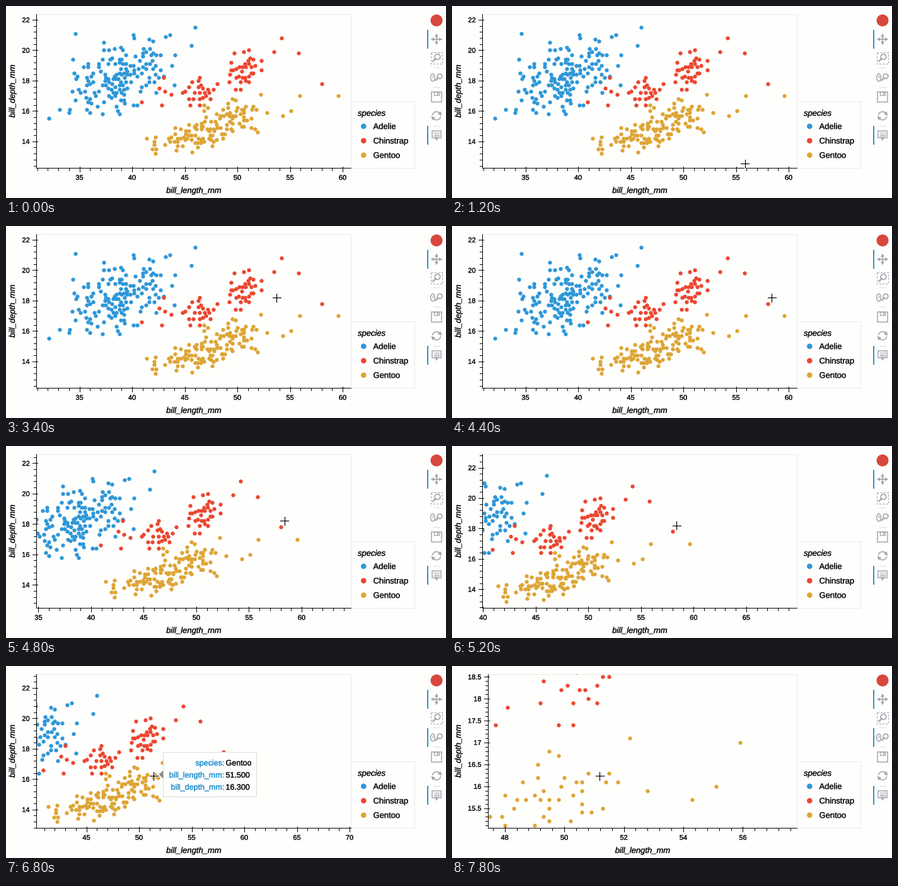
A matplotlib script that plays this animation: 698 by 306 pixels, repeating every 8000 ms.

```python
import math

import numpy as np
import matplotlib.pyplot as plt
from matplotlib.animation import FuncAnimation
from matplotlib.patches import Circle, Ellipse, FancyBboxPatch, Polygon, Rectangle
from matplotlib.patheffects import withStroke
from matplotlib.transforms import Affine2D

W, H, DPI = 698, 306, 100
STEP, FRAMES = 200, 40
PT = 72 / DPI  # points per pixel

BG, INK, EDGE, ICON, ACTIVE = "#fefefd", "#161616", "#e9e9e6", "#a1a6ac", "#2b95cf"
COLORS = {"Adelie": "#2e97d8", "Chinstrap": "#ec4630", "Gentoo": "#dda535"}
LEFT, TOP, RIGHT, BOTTOM = 48, 13, 547, 258

plt.rcParams["font.family"] = "Liberation Sans"
fig = plt.figure(figsize=(W / DPI, H / DPI), dpi=DPI, facecolor=BG)
ax = fig.add_axes([0, 0, 1, 1])
ax.set_xlim(0, W)
ax.set_ylim(H, 0)
ax.axis("off")


# ---------- drawing helpers ----------
def text(x, y, s="", size=13, color=INK, z=5, **kw):
    heavier = [withStroke(linewidth=0.35 * PT, foreground=color)]
    return ax.text(x, y, s, fontsize=size * PT, color=color, zorder=z,
                   path_effects=heavier, **kw)


def line(xs, ys, w=1, color=INK, z=4, **kw):
    return ax.plot(xs, ys, lw=w * PT, color=color, zorder=z, **kw)[0]


def shape(patch, face="none", edge="none", w=1, z=4):
    patch.set(facecolor=face, edgecolor=edge, linewidth=w * PT, zorder=z)
    return ax.add_patch(patch)


def rounded(x, y, w, h, r):
    return FancyBboxPatch((x, y), w, h, boxstyle=f"round,pad=0,rounding_size={r}")


# ---------- data ----------
rng = np.random.default_rng(7)


def cloud(n, mean, sd, corr, reach=2.1):
    """Correlated normal points on a 0.1 grid, cut at reach, without near twins."""
    pts = []
    while len(pts) < n:
        u, v = rng.standard_normal(2)
        v = corr * u + math.sqrt(1 - corr ** 2) * v
        x, y = round(mean[0] + sd[0] * u, 1), round(mean[1] + sd[1] * v, 1)
        twin = any(abs(x - a) < 0.2 and abs(y - b) < 0.15 for a, b in pts)
        if max(abs(u), abs(v)) < reach and not twin:
            pts.append((x, y))
    return pts


data = {
    "Adelie": cloud(145, (38.9, 18.4), (2.5, 1.25), 0.35)
    + [(32.1, 15.5), (33.1, 16.1), (34.6, 21.1), (46, 21.5), (45.6, 20.3), (44.1, 19.7)],
    "Chinstrap": cloud(24, (46.4, 17.6), (0.9, 0.75), 0.3)
    + cloud(34, (50.6, 19), (0.9, 0.75), 0.3)
    + cloud(5, (42.9, 17.2), (0.5, 0.6), 0)
    + [(58, 17.8), (55.8, 19.8), (54.2, 20.8), (53.5, 19.9), (40.9, 16.6)],
    "Gentoo": cloud(58, (45.5, 14.3), (2, 0.55), 0.35)
    + cloud(58, (49.2, 15.6), (1.8, 0.7), 0.3)
    + [(59.6, 17), (55.9, 17), (55.1, 16), (54.3, 15.7), (51.5, 16.3), (52.2, 17.1)],
}
data = {name: np.array(pts) for name, pts in data.items()}


# ---------- motion ----------
X0, X_SPAN, Y0, Y_SPAN = 30.898, 29.88, 12.257, 10.115
GRAB, DROP, TOOL = (507, 114), (351, 127), (674, 119)
ZOOM = 2.88
ENTER, TOOL_ON, TIP, ZOOM_AT = 1000, 6200, (6800, 7000), (7000, 7600)
LEGS = [(1000, 2200, (402, 114)), (3000, 4200, GRAB), (4400, 5300, DROP),
        (5300, 5800, TOOL), (6200, 6800, (234, 175))]


def ease(t, start, end):
    u = min(max((t - start) / (end - start), 0), 1)
    return u * u * (3 - 2 * u)


def pointer(t):
    pos = np.array([470.0, 262.0])
    for start, end, goal in LEGS:
        pos = pos + (np.array(goal) - pos) * ease(t, start, end)
    return pos


def view(t):
    """Axis ranges: dragged with the pointer, then zoomed about one point."""
    dx, dy = (np.array(DROP) - GRAB) * ease(t, 4400, 5300)
    k = ZOOM ** ease(t, *ZOOM_AT)
    x0 = X0 - dx * X_SPAN / (RIGHT - LEFT) + 0.369 * X_SPAN * (1 - 1 / k)
    y0 = Y0 + dy * Y_SPAN / (BOTTOM - TOP) + 0.3415 * Y_SPAN * (1 - 1 / k)
    return x0, X_SPAN / k, y0, Y_SPAN / k


def ticks(start, span):
    """Major and minor tick values, about six majors per axis."""
    base = 10 ** math.floor(math.log10(span / 6))
    step = min((m * base for m in (1, 2, 5, 10)), key=lambda s: abs(6 - span / s))

    def steps(d):
        first, last = math.ceil(start / d - 1e-6), math.floor((start + span) / d + 1e-6)
        return [round(i * d, 6) for i in range(first, last + 1)]

    return steps(step), steps(step / 5)


# ---------- fixed parts ----------
frame = shape(Rectangle((LEFT, TOP), RIGHT - LEFT, BOTTOM - TOP), edge=EDGE, z=1)
shape(Rectangle((547, 152), 101, 106), face=BG, edge=EDGE, z=3)
text(558, 175, "species", style="italic")
for i, (name, color) in enumerate(COLORS.items()):
    y = 191.7 + 23 * i
    shape(Circle((567.3, y), 4.3), face=color)
    text(582.5, y + 4.4, name)

x_title = text(298, 298, "bill_length_mm", style="italic", ha="center")
text(14, 135.5, "bill_depth_mm", style="italic", ha="center", rotation=90,
     rotation_mode="anchor")


def magnifier(x, y, r, reach):
    shape(Circle((x, y), r), edge=ICON, w=1.7)
    k = r * 0.72
    line([x - k, x - k - reach], [y + k, y + k + reach], 2.4, ICON)


def arrow_head(x, y, angle, size=3.6):
    a = np.radians(angle + np.array([0, 125, 235]))
    shape(Polygon(np.c_[x + size * np.cos(a), y + size * np.sin(a)]), face=ICON)


def toolbar(x):
    shape(Circle((x, 23), 9.5), face="#d8473c")
    for y in (98, 129, 191):
        line([x - 5, x + 5], [y, y], 1, "#dcdcd8")

    # pan
    for a in range(0, 360, 90):
        c, s = math.cos(math.radians(a)), math.sin(math.radians(a))
        line([x, x + 6 * c], [53, 53 + 6 * s], 1.6, ICON)
        arrow_head(x + 5.8 * c, 53 + 5.8 * s, a)

    # box zoom
    shape(Rectangle((x - 9, 74), 18, 18), edge=ICON, w=1.2).set_linestyle((0, (2.4, 2)))
    magnifier(x + 1.5, 81, 4.3, 4)

    # wheel zoom
    shape(Ellipse((x - 6, 114), 6.5, 12), edge=ICON, w=1.5)
    line([x - 6, x - 6], [111, 114], 1.2, ICON)
    magnifier(x + 5, 112, 3.8, 3.6)

    # save
    shape(Rectangle((x - 8, 137), 16, 16), edge=ICON, w=1.5)
    shape(Rectangle((x - 4, 137), 8, 5), edge=ICON, w=1.3)
    line([x + 1.6, x + 1.6], [138, 141], 1.6, ICON)

    # reset
    for a0 in (195, 15):
        a = np.radians(np.linspace(a0, a0 + 135, 20))
        xs, ys = x + 6.6 * np.cos(a), 175 + 6.6 * np.sin(a)
        line(xs, ys, 1.6, ICON)
        arrow_head(xs[-1], ys[-1], a0 + 215, 4)

    # hover
    shape(Rectangle((x - 7, 199), 14, 11), edge=ICON, w=1.5)
    arrow_head(x, 211.5, 90, 3.5)
    for y in (202, 204.5, 207):
        line([x - 4.2, x + 4.2], [y, y], 1.1, ICON)


def active_bar(y):
    return shape(Rectangle((668, y), 2, 30), face=ACTIVE)


toolbar(683)
active_bar(38)
active_bar(191)
wheel_bar = active_bar(99)

# ---------- moving parts ----------
dots = [ax.scatter([], [], s=(6.3 * PT) ** 2, color=c, linewidths=0, zorder=2)
        for c in COLORS.values()]
axis_lines = line([], [], color="black")
tick_lines = line([], [], color="black")
x_labels = [text(0, 277, size=11, ha="center") for _ in range(14)]
y_labels = [text(0, 0, size=11, ha="right") for _ in range(14)]

tip = [shape(Rectangle((249, 137), 148, 71), face=BG, edge="#dcdcd8", z=6),
       shape(Polygon([(242.5, 173), (249.5, 166.5), (249.5, 179.5)]), face="#8c8c8c", z=6)]
rows = {"species:": "Gentoo", "bill_length_mm:": "51.500", "bill_depth_mm:": "16.300"}
for i, (key, value) in enumerate(rows.items()):
    y = 158.5 + 19.3 * i
    tip += [text(346.5, y, key, 12.5, ACTIVE, 7, ha="right"),
            text(348.5, y, value, 12.5, INK, 7)]

CROSS_X = np.array([-6.5, 6.5, np.nan, 0, 0])
CROSS_Y = np.array([0, 0, np.nan, -6.5, 6.5])
cross = [line([], [], 3, "white", 8), line([], [], 1.2, "black", 9)]

hand = [shape(rounded(-5 + 3 * i, top, 3, 8 - top, 1.4), "white", "black", 1, 9)
        for i, top in enumerate((-8, -2.5, -2, -1))]
hand.append(shape(Ellipse((-5.5, 3), 3, 6, angle=-40), "white", "black", 1, 8))
hand.append(shape(rounded(-4.5, 3, 11, 6, 2), "white", z=10))


def fill(labels, values, places):
    for i, label in enumerate(labels):
        label.set_visible(i < len(values))
        if i < len(values):
            label.set_text(f"{values[i]:g}")
            label.set_position(places[i])


def draw_axes(x0, x_span, y0, y_span):
    x_sets, y_sets = ticks(x0, x_span), ticks(y0, y_span)
    left = 57 if any(v % 1 for v in y_sets[0]) else LEFT

    def px(v):
        return left + (v - x0) / x_span * (RIGHT - left)

    def py(v):
        return BOTTOM - (v - y0) / y_span * (BOTTOM - TOP)

    frame.set_bounds(left, TOP, RIGHT - left, BOTTOM - TOP)
    for dot, pts in zip(dots, data.values()):
        dot.set_offsets(np.c_[px(pts[:, 0]), py(pts[:, 1])])
        dot.set_clip_path(frame)

    axis_lines.set_data([left, left, RIGHT], [TOP, BOTTOM, BOTTOM])
    path = []
    for xs, ys, inner, outer in zip(x_sets, y_sets, (2, 0), (6, 4)):
        for v in xs:
            path += [(px(v), BOTTOM - inner), (px(v), BOTTOM + outer), (np.nan, np.nan)]
        for v in ys:
            path += [(left + inner, py(v)), (left - outer, py(v)), (np.nan, np.nan)]
    tick_lines.set_data(*np.array(path).T)

    fill(x_labels, x_sets[0], [(px(v), 277) for v in x_sets[0]])
    fill(y_labels, y_sets[0], [(left - 10.5, py(v) + 4) for v in y_sets[0]])
    x_title.set_x((left + RIGHT) / 2 + 0.5)


def draw_pointer(t):
    x, y = pointer(t)
    for part in cross:
        part.set_visible(t >= ENTER and x < RIGHT)
        part.set_data(x + CROSS_X, y + CROSS_Y)
    for part in hand:
        part.set_visible(x > 660)
        part.set_transform(Affine2D().translate(x, y) + ax.transData)


def draw(i):
    t = i * STEP
    draw_axes(*view(t))
    draw_pointer(t)
    wheel_bar.set_visible(t >= TOOL_ON)
    for part in tip:
        part.set_visible(TIP[0] <= t <= TIP[1])
    return []


anim = FuncAnimation(fig, draw, frames=FRAMES, interval=STEP, repeat=True,
                     repeat_delay=0, blit=False)
plt.show()
```
